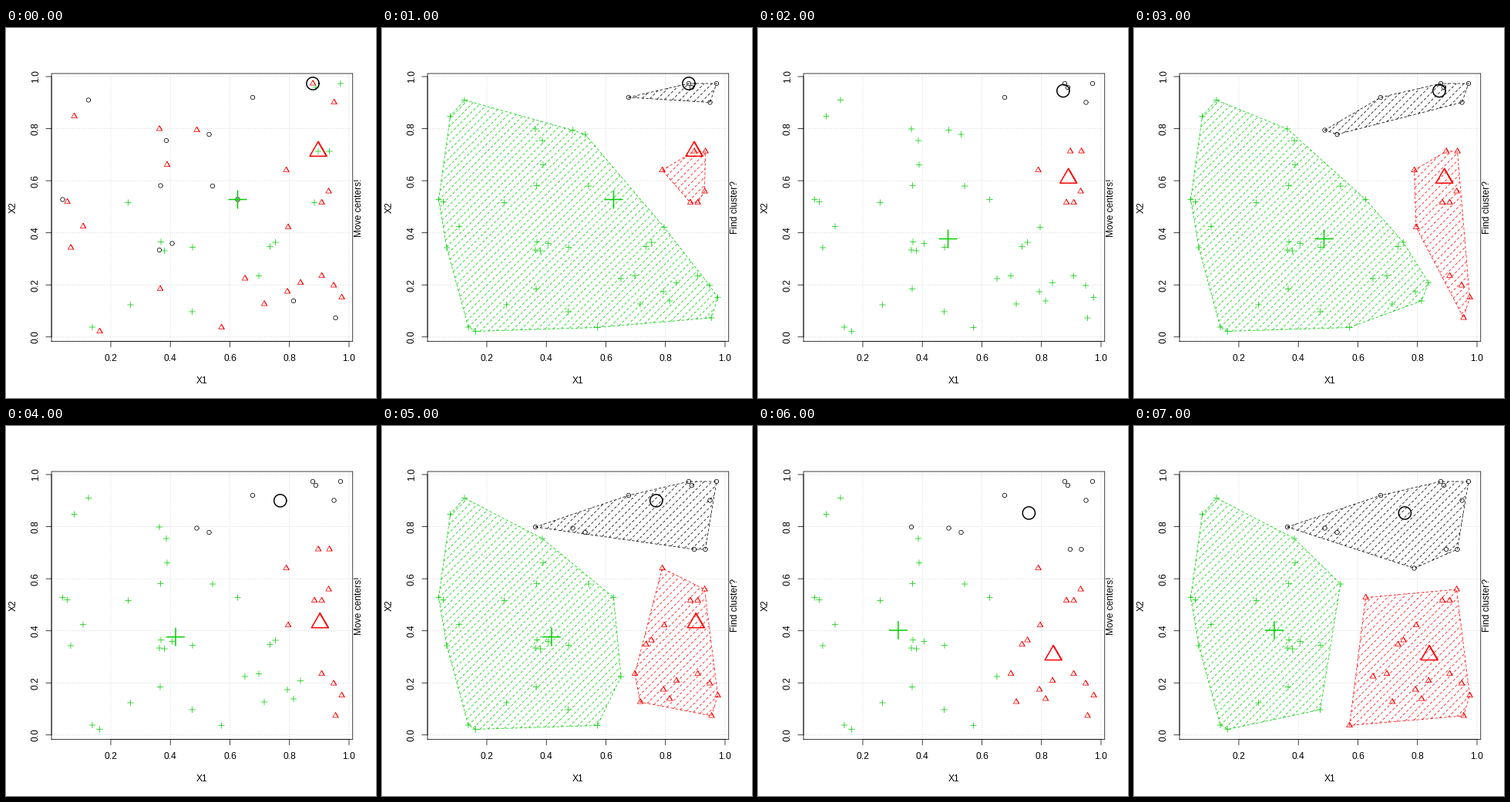
These frames come from a looping animation (480 px wide and 480 px high, 8000 ms). A matplotlib script:

```python
import numpy as np
import matplotlib as mpl
import matplotlib.pyplot as plt
from matplotlib.animation import ArtistAnimation
from matplotlib.collections import LineCollection

mpl.rcParams["path.snap"] = False
mpl.rcParams["font.family"] = "Liberation Sans"
mpl.rcParams["font.size"] = 12

SIZE = 480
LEFT, RIGHT, TOP, BOTTOM = 59.04, 449.76, 59.04, 406.56
ORIGIN = np.array([58.7, 400.8])    # pixel position of (0, 0)
UNIT = np.array([386.3, 337.8])     # pixels per data unit
THIN, THICK = 0.75, 1.5
COLORS = ["black", "#ff0000", "#00cd00"]
HATCH_STEP = 7.2 * np.sqrt(2)

# Pixel positions, grouped by the starting cluster.
CIRCLES = [107, 93.5, 320, 90, 208, 146, 263.5, 138, 200.5, 204.5, 268, 205,
           73.5, 222.5, 300.5, 222.5, 199, 288, 215.5, 279.5, 373, 354,
           427.5, 376]
TRIANGLES = [88.5, 114.5, 199, 131, 247.5, 132.5, 209, 177.5, 79.5, 225.5,
             100, 257.5, 84, 285, 200, 338.5, 121.5, 393.5, 279.5, 388.5,
             310, 325, 335, 358, 365, 342, 382, 330.5, 409.5, 321.5,
             425, 334, 435.5, 349.5, 366, 258.5, 409.5, 226.5, 418.5, 212,
             363.5, 184.5, 425.5, 96.5, 398, 72]
CROSSES = [434, 72, 402, 77, 405, 160, 419.5, 160, 400, 226.5, 158.5, 226.5,
           201, 277.5, 205.5, 289, 242, 284.5, 342.5, 283.5, 349.5, 278,
           328, 321.5, 161.5, 359, 241.5, 368, 112, 388]

groups = [np.reshape(g, (-1, 2)) for g in (CIRCLES, TRIANGLES, CROSSES)]
points = np.vstack(groups)
labels = np.repeat(range(3), [len(g) for g in groups])
centers = np.array([[398, 72], [405, 160], [300.5, 222.5]])

fig = plt.figure(figsize=(SIZE / 72, SIZE / 72), dpi=72, facecolor="white")
ax = fig.add_axes([0, 0, 1, 1])
ax.set_xlim(0, SIZE)
ax.set_ylim(SIZE, 0)
ax.axis("off")


def lines(segments, color, width=THIN, dash="solid", z=2):
    return ax.add_collection(LineCollection(
        segments, colors=[color], linewidths=width, linestyles=[dash],
        capstyle="round", joinstyle="round", zorder=z), autolim=False)


def label(x, y, text, angle=0):
    """Centre text along its baseline at (x, y)."""
    if angle:
        return ax.text(x, y, text, rotation=90, ha="right", va="center",
                       rotation_mode="default") if False else ax.text(
            x, y, text, rotation=90, rotation_mode="anchor",
            ha="center", va="baseline")
    return ax.text(x, y, text, ha="center", va="baseline")


def symbol(kind, pos, scale):
    """Polylines of a circle, triangle or cross around pos."""
    r = 2.7 * scale
    if kind == 0:
        a = np.linspace(0, 2 * np.pi, 49)
        shapes = [np.column_stack([np.cos(a), np.sin(a)])]
    elif kind == 1:
        w, up, down = 1.3468, -1.5551, 0.7776
        shapes = [np.array([(0, up), (w, down), (-w, down), (0, up), (w, down)])]
    else:
        d = np.sqrt(2)
        shapes = [np.array([(-d, 0), (d, 0)]), np.array([(0, -d), (0, d)])]
    return [pos + r * s for s in shapes]


def hull(pts):
    """Closed convex hull by the monotone chain."""
    def chain(seq):
        out = []
        for p in seq:
            while len(out) > 1:
                a, b = out[-1] - out[-2], p - out[-2]
                if a[0] * b[1] - a[1] * b[0] > 0:
                    break
                out.pop()
            out.append(p)
        return out

    seq = sorted(pts, key=tuple)
    return np.array(chain(seq)[:-1] + chain(seq[::-1]))


def hatch(loop):
    """Rising 45 degree lines clipped to a closed convex loop."""
    level = loop.sum(axis=1)
    base = ORIGIN.sum()
    first = int(np.ceil((level.min() - base) / HATCH_STEP))
    last = int(np.floor((level.max() - base) / HATCH_STEP))
    segments = []
    for k in range(first, last + 1):
        c = base + k * HATCH_STEP
        hits = []
        for p, q, u, v in zip(loop, loop[1:], level, level[1:]):
            if (u < c) != (v < c):
                hits.append(p + (q - p) * (c - u) / (v - u))
        if len(hits) == 2:
            segments.append(sorted(hits, key=tuple))
    return segments


def draw_axes():
    dots = (0, (1, 3))
    xs = [ORIGIN[0] + UNIT[0] * t / 5 for t in range(1, 6)]
    ys = [ORIGIN[1] - UNIT[1] * t / 5 for t in range(6)]
    grid = [[(x, BOTTOM), (x, TOP)] for x in xs]
    grid += [[(LEFT, y), (RIGHT, y)] for y in ys]
    lines(grid, "lightgray", dash=dots, z=1)

    frame = [(LEFT, BOTTOM), (RIGHT, BOTTOM), (RIGHT, TOP), (LEFT, TOP),
             (LEFT, BOTTOM)]
    axes = [[(xs[0], BOTTOM), (xs[-1], BOTTOM)], [(LEFT, ys[0]), (LEFT, ys[-1])]]
    ticks = [[(x, BOTTOM), (x, BOTTOM + 7.2)] for x in xs]
    ticks += [[(LEFT, y), (LEFT - 7.2, y)] for y in ys]
    lines([frame] + axes + ticks, "black")

    for i, x in enumerate(xs):
        label(x, 432.5, f"{(i + 1) / 5:.1f}")
    for i, y in enumerate(ys):
        label(41.8, y, f"{i / 5:.1f}", 90)
    label((LEFT + RIGHT) / 2, 461.3, "X1")
    label(13, (TOP + BOTTOM) / 2, "X2", 90)


def draw_state(labels, centers, hint, show_hulls):
    artists = [label(461.3, (TOP + BOTTOM) / 2, hint, 90)]
    for j, color in enumerate(COLORS):
        own = points[labels == j]
        if show_hulls:
            loop = hull(own)
            artists.append(lines(hatch(loop) + [loop], color, dash=(0, (4, 4))))
        marks = [s for p in own for s in symbol(j, p, 1)]
        artists.append(lines(marks, color, z=3))
        artists.append(lines(symbol(j, centers[j], 3), color, THICK, z=4))
    return artists


draw_axes()
frames = []
for step in range(4):
    if step:
        centers = np.array([points[labels == j].mean(axis=0) for j in range(3)])
    frames.append(draw_state(labels, centers, "Move centers!", False))
    gaps = (points[:, None] - centers) / UNIT
    labels = (gaps ** 2).sum(axis=2).argmin(axis=1)
    frames.append(draw_state(labels, centers, "Find cluster?", True))

anim = ArtistAnimation(fig, frames, interval=1000, repeat=True, repeat_delay=0)
plt.show()
```
